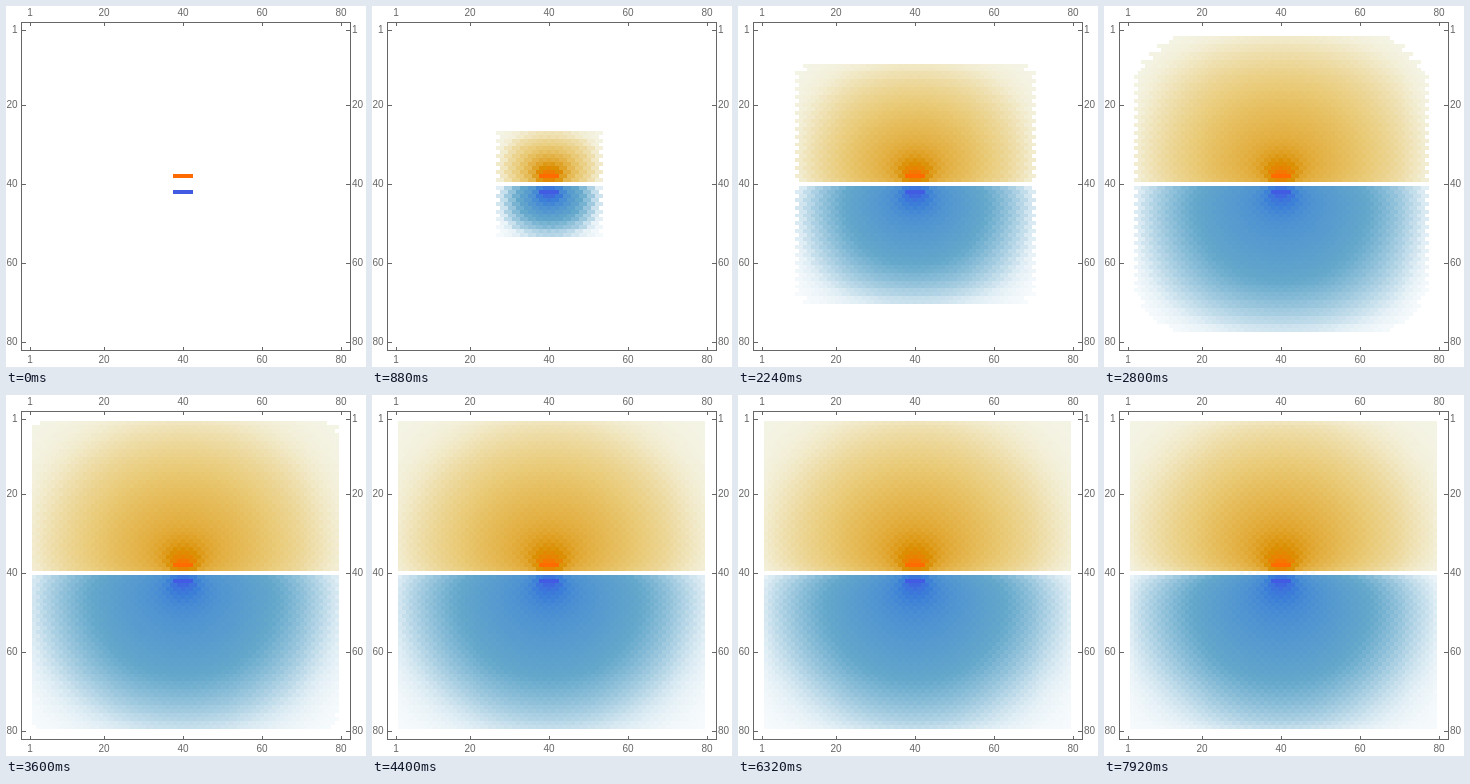
An HTML page with a canvas for the animation above (8000 ms loop, 360 by 361 pixels).

```html
<!DOCTYPE html>
<html lang="en">
<head>
<meta charset="utf-8">
<title>Matrix plot of a relaxing field</title>
<style>
  html, body { margin: 0; width: 100%; height: 100%; overflow: hidden; background: #fff; }
  canvas, svg { position: absolute; left: 0; top: 0; width: 100vw; height: 100vh; display: block; }
  text { font: 10px "Liberation Sans", Arial, sans-serif; fill: #666; }
  path { fill: none; stroke: #666; stroke-width: 1; shape-rendering: crispEdges; }
</style>
</head>
<body>
<canvas id="plot" width="360" height="361"></canvas>
<svg id="axes" viewBox="0 0 360 361" preserveAspectRatio="none"></svg>
<script>
const N = 80, STEPS = 100, STEP_MS = 80;
const edgeX = c => 21.7 + 3.94 * (c - 1);
const edgeY = r => 22.1 + 3.945 * (r - 1);

// Colour stops from zero to full strength, for each sign
const WARM = [[244, 244, 229], [233, 202, 118], [219, 143, 2], [255, 107, 0]];
const COOL = [[246, 250, 252], [100, 168, 203], [59, 127, 216], [66, 91, 227]];

function shade(stops, s) {
  const k = Math.min(2, Math.floor(s * 3)), f = s * 3 - k;
  const mix = stops[k].map((a, i) => Math.round(a + (stops[k + 1][i] - a) * f));
  return `rgb(${mix})`;
}

const at = (r, c) => (r - 1) * N + c - 1;

function hold(u) {
  for (let c = 38; c <= 42; c++) {
    u[at(38, c)] = 1;
    u[at(42, c)] = -1;
  }
  return u;
}

// Each cell becomes the mean of its four diagonal neighbours
function relax(u) {
  const v = new Float64Array(N * N);
  for (let r = 2; r < N; r++) {
    for (let c = 2; c < N; c++) {
      v[at(r, c)] = (u[at(r - 1, c - 1)] + u[at(r - 1, c + 1)] +
                     u[at(r + 1, c - 1)] + u[at(r + 1, c + 1)]) / 4;
    }
  }
  return hold(v);
}

// Strength blends the value with its rank among cells of the same sign
function colour(u) {
  const out = new Array(N * N).fill(null);
  for (const [sign, stops] of [[1, WARM], [-1, COOL]]) {
    const cells = [];
    u.forEach((x, i) => {
      if (x * sign > 0 && 0.5 + x / 2 !== 0.5) cells.push(i);
    });
    cells.sort((a, b) => sign * (u[a] - u[b]));
    cells.forEach((i, k) => {
      const x = Math.abs(u[i]);
      const q = x === 1 ? 1 : k / cells.length;
      out[i] = shade(stops, (q + x) / 2);
    });
  }
  return out;
}

const states = [];
let field = hold(new Float64Array(N * N));
for (let n = 0; n < STEPS; n++) {
  states.push(colour(field));
  field = relax(field);
}

const ctx = document.getElementById("plot").getContext("2d");

function draw(n) {
  ctx.fillStyle = "#fff";
  ctx.fillRect(0, 0, 360, 361);
  for (let r = 1; r <= N; r++) {
    const y = Math.round(edgeY(r)), h = Math.round(edgeY(r + 1)) - y;
    for (let c = 1; c <= N; c++) {
      const fill = states[n][at(r, c)];
      if (!fill) continue;
      const x = Math.round(edgeX(c));
      ctx.fillStyle = fill;
      ctx.fillRect(x, y, Math.round(edgeX(c + 1)) - x, h);
    }
  }
}

function axes() {
  let d = "M15.5 16.5H344.5V344.5H15.5Z", labels = "";
  const label = (x, y, anchor, v) => {
    labels += `<text x="${x}" y="${y}" text-anchor="${anchor}">${v}</text>`;
  };
  for (const v of [1, 20, 40, 60, 80]) {
    const x = Math.round(edgeX(v + 0.5) - 0.05), y = Math.round(edgeY(v + 0.5));
    d += `M${x + 0.5} 16v4M${x + 0.5} 345v-4M15 ${y + 0.5}h5M345 ${y + 0.5}h-5`;
    label(x, 10, "middle", v);
    label(x, 357, "middle", v);
    label(11.5, y + 3, "end", v);
    label(346, y + 3, "start", v);
  }
  document.getElementById("axes").innerHTML = `<path d="${d}"/>${labels}`;
}

let shown = -1;
const start = performance.now();

function tick() {
  const n = Math.floor((performance.now() - start) / STEP_MS) % STEPS;
  if (n !== shown) draw(shown = n);
  requestAnimationFrame(tick);
}

axes();
tick();
</script>
</body>
</html>
```
